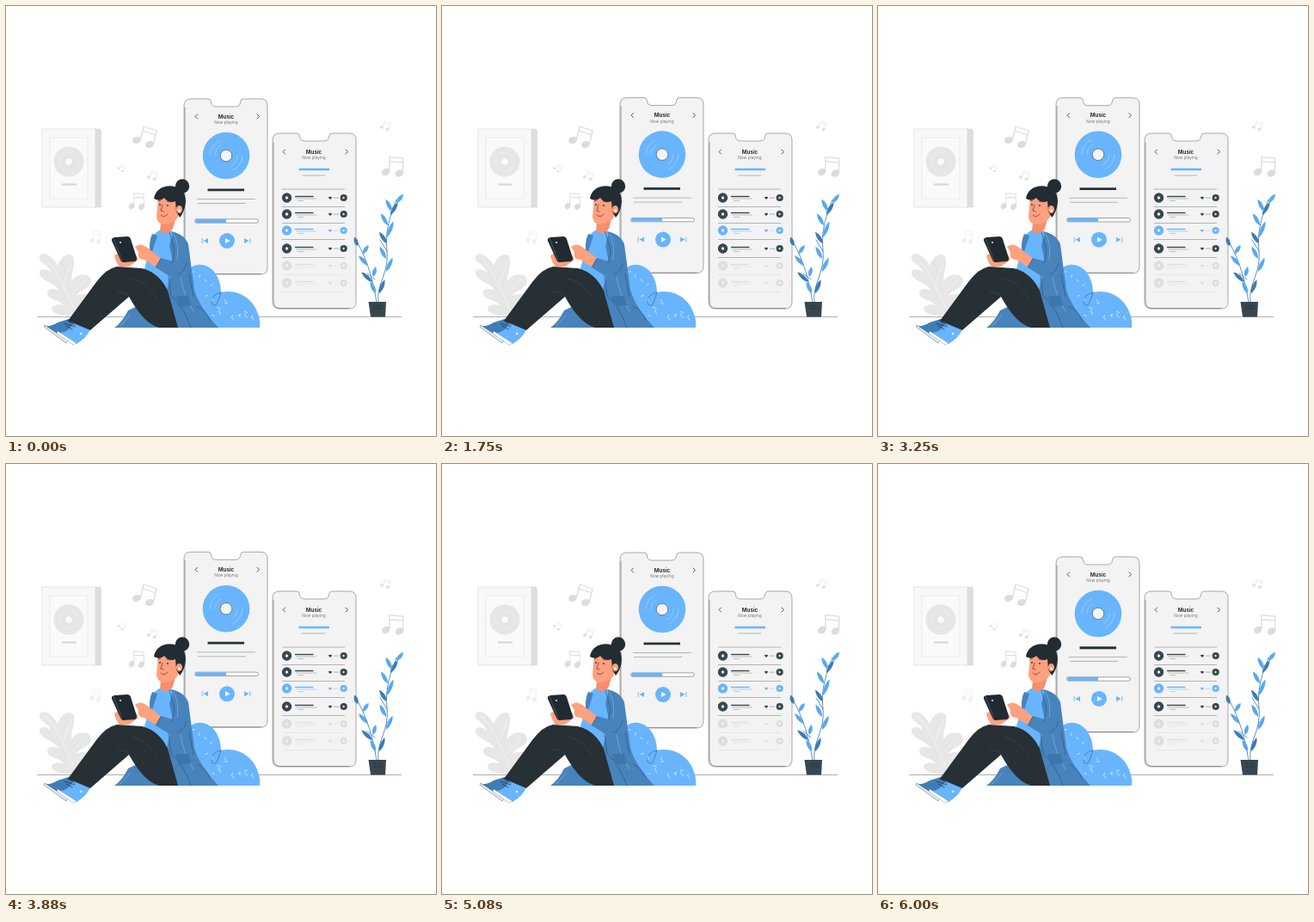
An HTML page for the animation above (6040 ms loop, 500x500 px).

```html
<!DOCTYPE html>
<html lang="en">
<head>
<meta charset="utf-8">
<title>Music</title>
<style>
html, body { margin: 0; width: 100%; height: 100%; overflow: hidden; background: #fff; }
svg { display: block; width: 100%; height: 100%; }
text { font-family: Inter, Roboto, sans-serif; text-anchor: middle; }
.title { font-size: 6.2px; font-weight: 700; fill: #263238; }
.sub { font-size: 4.7px; fill: #777; }
.line { fill: none; stroke-linecap: round; stroke-linejoin: round; }
</style>
</head>
<body>
<svg id="stage" viewBox="0 0 500 500">
  <defs>
    <path id="body" d="M8 0H28Q31.500 0 31.500 4Q32 9 37 9H60Q65 9 65.500 4Q66 0 69 0H89Q97 0 97 8V196Q97 204 89 204H8Q0 204 0 196V8Q0 0 8 0Z"/>
    <g id="note" fill="#dcdcdc">
      <ellipse cx="-9" cy="2" rx="5" ry="4" transform="rotate(-15 -9 2)"/>
      <ellipse cx="6" cy="7" rx="5" ry="4" transform="rotate(-15 6 7)"/>
      <path class="line" d="M-4.500 1L-1-14L14-9L10.500 6M-2-9L13-4" stroke="#dcdcdc" stroke-width="1.300"/>
    </g>
    <g id="disc"><circle r="5.700"/><circle r="1.700" fill="#eee"/></g>
  </defs>

  <path d="M36 361.500H460" stroke="#8c8c8c" stroke-width=".7"/>

  <g id="picture" stroke="#dadada" stroke-width=".7">
    <path d="M103 143H109L110.500 145V234H103Z" fill="#dedede"/>
    <path d="M42 143H104V234H42Z" fill="#f8f8f8"/>
    <path d="M51 153H95V224H51Z" fill="#fafafa" stroke="#e5e5e5"/>
    <circle cx="73" cy="181" r="17.500" fill="#e6e6e6" stroke="none"/>
    <circle cx="73" cy="181" r="11" fill="none" stroke="#f0f0f0"/>
    <circle cx="73" cy="181" r="4.500" fill="#fafafa"/>
    <path d="M65 207.500H82" stroke="#d3d3d3" stroke-width="2"/>
  </g>

  <g id="notes">
    <use href="#note" transform="translate(161 154)"/>
    <use href="#note" transform="translate(152 229) scale(.72 .85) rotate(-15)"/>
    <use href="#note" transform="translate(450 189) rotate(-13)"/>
    <use href="#note" transform="translate(134 189) scale(.35) rotate(20)" opacity=".8"/>
    <use href="#note" transform="translate(170 198) scale(.45)" opacity=".8"/>
    <use href="#note" transform="translate(441 140) scale(.45)" opacity=".8"/>
    <use href="#note" transform="translate(104 270) scale(.48 .65) rotate(-10)" opacity=".45"/>
  </g>

  <g id="shadePlant">
    <path d="M85 361C66 361 53 358 53 352C53 347 63 346 67 349C64 341 48 342 48 334C48 327 59 329 61 331C59 322 41 321 39 311C38 304 49 306 52 310C49 299 37 299 39 291C43 283 55 292 60 302C64 290 74 286 78 291C82 300 75 311 76 320C84 308 100 311 99 321C98 329 85 330 82 337C91 332 105 336 104 345C103 353 94 359 85 361Z" fill="#e7e7e7"/>
    <path class="line" d="M46 293C62 309 69 333 82 358M76 298L67 321M92 318L74 338" stroke="#f5f5f5" stroke-width=".8"/>
  </g>

  <g id="player">
    <use href="#body" x="207" y="108" fill="#f3f3f3" stroke="#858585" stroke-width=".7"/>
    <path class="line" d="M208 118V304Q208 311 215 311.500H296" stroke="#666" stroke-width=".6"/>
    <text class="title" x="256" y="130.700">Music</text>
    <text class="sub" x="256" y="137">Now playing</text>
    <path class="line" d="M222.500 126L220 128.500L222.500 131M292 126L294.500 128.500L292 131" stroke="#444" stroke-width=".9"/>
    <circle cx="256" cy="174" r="27.300" fill="#68b5fd"/>
    <path class="line" d="M237 174A19 19 0 0 1 248 157M275 174A19 19 0 0 1 264 191M243 174A13 13 0 0 1 250 162.500M269 174A13 13 0 0 1 262 185.500" stroke="#a7d4fe" stroke-width=".7"/>
    <circle cx="256" cy="174" r="6.800" fill="#f4f4f4" stroke="#455a64" stroke-width=".7"/>
    <path d="M234.500 213.800H277" stroke="#263238" stroke-width="2.800"/>
    <path d="M222 224.500H290M223 229.500H279" stroke="#999" stroke-width=".7"/>
    <rect x="219.500" y="247.800" width="74" height="4.400" rx="2.200" fill="#fff" stroke="#666" stroke-width=".6"/>
    <path d="M221 248H256V252H221Q219.500 250 221 248Z" fill="#68b5fd"/>
    <circle cx="257" cy="273" r="9" fill="#68b5fd"/>
    <path d="M255 270L260.500 273L255 276Z" fill="#fff"/>
    <path d="M235 270V276L229.500 273ZM227.700 270H228.600V276H227.700ZM277 270V276L282.500 273ZM283.400 270H284.300V276H283.400Z" fill="#68b5fd"/>
  </g>

  <g id="list">
    <use href="#body" x="310" y="148" fill="#f3f3f3" stroke="#858585" stroke-width=".7"/>
    <path class="line" d="M311 159V343Q311 350.500 318 351.500H399" stroke="#666" stroke-width=".6"/>
    <text class="title" x="358" y="171.700">Music</text>
    <text class="sub" x="358" y="178">Now playing</text>
    <path class="line" d="M324.500 167L322 169.500L324.500 172M395 167L397.500 169.500L395 172" stroke="#444" stroke-width=".9"/>
    <path d="M340.500 190H376" stroke="#68b5fd" stroke-width="2.500"/>
    <path d="M344 197H371" stroke="#999" stroke-width=".7"/>
    <g id="rows"></g>
  </g>

  <g id="plant">
    <path class="line" d="M431 345C427 320 421 297 408 274M433 345C430 323 446 310 443 284C440 260 448 242 454 225M429 318L420 311M443 285L435 272" stroke="#3974a8" stroke-width=".8"/>
    <g id="leaves"></g>
    <path d="M421.500 344H442L441 361.500H424Z" fill="#37474f"/>
    <path d="M427 349H438M427 352H439" stroke="#263238" stroke-width=".7"/>
  </g>

  <g id="cushion">
    <path d="M211 374V312C214 298 232 297 242 309Q250 319 250 333C270 328 288 341 293 358Q296 366 295 374Z" fill="#68b5fd"/>
    <path class="line" d="M250 333Q239 335 239 345Q240 350 245 347Q248 340 250 333" stroke="#3579b4" stroke-width=".8"/>
    <g id="stitches" stroke="#d4eaff" stroke-width=".8"></g>
  </g>

  <g id="woman">
    <path d="M126 374Q135 368 142 354L182 335L205 374Z" fill="#4883bc"/>
    <path d="M188 261Q207 264 212 277L219 330Q225 351 247 374H199L178 338L185 303Z" fill="#4883bc"/>
    <path d="M178 261L191 260Q198 271 197 288L187 330L159 312L165 291L170 267Z" fill="#68b5fd"/>
    <path d="M170 265Q165 275 168 292L176 267Z" fill="#4883bc"/>
    <path d="M181 244H198L194 259Q187 269 179 261Z" fill="#f68f6d"/>
    <path d="M177 221Q181 216 193 219L203 232Q202 249 192 252Q178 258 175 246Z" fill="#ffa07e"/>
    <circle cx="205" cy="209.500" r="8.200" fill="#222c33"/>
    <path d="M172 224C174 209 193 205 204 214C213 222 208 240 202 246L198 239L197 227Q189 230 184 223Q179 228 172 224Z" fill="#222c33"/>
    <ellipse cx="201.500" cy="236.500" rx="3.600" ry="4.600" fill="#ffa07e"/>
    <circle cx="201.500" cy="238" r="1.400" fill="#fff"/>
    <path class="line" d="M177 227L180 226M187 227L191 228M182 231L180 238L183 239M180 243Q184 247 188 242" stroke="#7b3e35" stroke-width=".8"/>
    <circle cx="179" cy="231" r=".9" fill="#263238"/><circle cx="188" cy="232" r=".9" fill="#263238"/>

    <g id="shoes">
      <path d="M60 368L76 363L84 372L72 388L45 372Q53 373 60 368Z" fill="#3e7db8"/>
      <path d="M45 371L72 389L70 392L44 373Z" fill="#e5eef5" stroke="#455a64" stroke-width=".5"/>
      <path d="M79 366L98 376Q94 386 82 393L63 380Q75 379 79 366Z" fill="#68b5fd"/>
      <path d="M60 378L82 392L78 394L59 381Z" fill="#fff" stroke="#7297b7" stroke-width=".5"/>
      <path class="line" d="M70 372L77 376M68 369L80 373M72 366L80 371" stroke="#263238" stroke-width=".7"/>
      <circle cx="87" cy="381" r="1.200" fill="#fff"/>
    </g>
    <path d="M72 366L105 321Q117 305 129 303L158 305Q178 310 188 331L200 374H178Q160 369 143 338L98 377Z" fill="#263035"/>
    <path class="line" d="M143 338Q140 333 130 332M146 317Q162 319 176 341" stroke="#45535a" stroke-width=".5"/>

    <path d="M126 290L131 287L139 292L151 289L154 295L143 303H132Q127 297 126 290Z" fill="#ffa07e"/>
    <path d="M126 269L141 268Q144 268 145 271L152 293Q152 297 149 297L137 298Q134 298 133 295L123 273Q122 270 126 269Z" fill="#202a30"/>
    <path d="M125 270L135 296" stroke="#607079" stroke-width=".6"/>
    <circle cx="133" cy="275" r="1.100" fill="#d5dee4"/>
    <path d="M150 280Q156 275 163 280L181 294L175 304L161 295Q152 295 154 286Z" fill="#ffa07e"/>
    <path d="M194 263Q211 267 212 283L211 297Q207 312 190 314L174 304L180 293L194 297L190 279Z" fill="#4883bc"/>
    <path class="line" d="M190 263L196 285L193 299M210 299Q208 309 200 312M189 314L192 337Q207 350 215 374M213 312L218 338M222 349Q231 352 237 365M180 294L174 304" stroke="#255b8c" stroke-width=".7"/>
    <path class="line" d="M195 265Q202 279 199 295M203 315Q206 336 218 355M133 372L144 360" stroke="#8bbde8" stroke-width=".6"/>
    <path d="M197 337H212L215 348L201 350Z" fill="#3d76ad"/>
  </g>
</svg>
<script>
const LOOP = 6040, CYCLES = 4, LIFT = 6;
const byId = id => document.getElementById(id);
const hline = (x1, x2, y, color, width) =>
  `<path d="M${x1} ${y}H${x2}" stroke="${color}" stroke-width="${width}"/>`;

function row(y, i) {
  const faded = i > 3;
  const main = faded ? '#dedede' : i === 2 ? '#68b5fd' : '#37474f';
  const soft = faded ? '#dedede' : i === 2 ? '#8dc5fa' : '#a2a8ab';
  return `<use href="#disc" x="326.500" y="${y}" fill="${main}"/>`
    + hline(336, 357.5, y - 1.5, main, 1.4)
    + hline(337, 361, y + 1, soft, .7)
    + hline(339, 346, y + 3.5, soft, .7)
    + `<path d="M377 ${y + 2}l-2-2q0-2 2-1q2-1 2 1z" fill="${main}"/>`
    + [382, 384, 386].map(x => `<circle cx="${x}" cy="${y}" r=".5" fill="${main}"/>`).join('')
    + `<circle cx="392.700" cy="${y}" r="4.100" fill="${main}"/>`
    + `<path d="M391.700 ${y - 1.5}l2.600 1.500l-2.600 1.500z" fill="#fff"/>`
    + hline(321, 394, y + 10.5, faded ? '#e1e1e1' : '#999', .7);
}
byId('rows').innerHTML = hline(321, 394, 213, '#999', .7)
  + [223, 242, 261, 282, 302, 322].map(row).join('');

// Each leaf: base x, base y, angle from upright, length.
const leaves = [
  [409, 279, -20, 11], [415, 288, 33, 12], [421, 302, -43, 16],
  [426, 321, -48, 17], [427, 315, 14, 12], [430, 334, -25, 15],
  [434, 334, 22, 17], [442, 309, 25, 18], [442, 294, -28, 16],
  [443, 276, -34, 16], [443, 269, 22, 20], [444, 255, -30, 16],
  [447, 243, 30, 17], [449, 239, -28, 16], [454, 229, 38, 13]
];
byId('leaves').innerHTML = leaves.map(([x, y, angle, size], i) =>
  `<path d="M0 0C-4 ${-size * .35} -2 ${-size * .8} 0 ${-size}C3 ${-size * .7} 3 ${-size * .3} 0 0Z"
    fill="${i % 3 ? '#58a9f2' : '#3c7cb5'}" transform="translate(${x} ${y}) rotate(${angle})"/>`).join('');

byId('stitches').innerHTML = Array.from({ length: 22 }, (_, i) => {
  const x = 218 + (i * 31) % 70;
  const top = x < 245 ? 309 : 340 + Math.max(0, x - 270) * .7;
  const y = top + (i * 17) % (366 - top);
  return `<path d="M-2 0H2" transform="translate(${x} ${y}) rotate(${i * 67})"/>`;
}).join('');

const player = byId('player');
function draw(time) {
  const phase = (time % LOOP) / LOOP * CYCLES * 2 * Math.PI;
  const y = -LIFT * (1 - Math.cos(phase)) / 2;
  player.setAttribute('transform', `translate(0 ${y.toFixed(3)})`);
}

let start;
function tick(now) {
  start ??= now;
  draw(now - start);
  requestAnimationFrame(tick);
}
draw(0);
requestAnimationFrame(tick);
</script>
</body>
</html>
```
